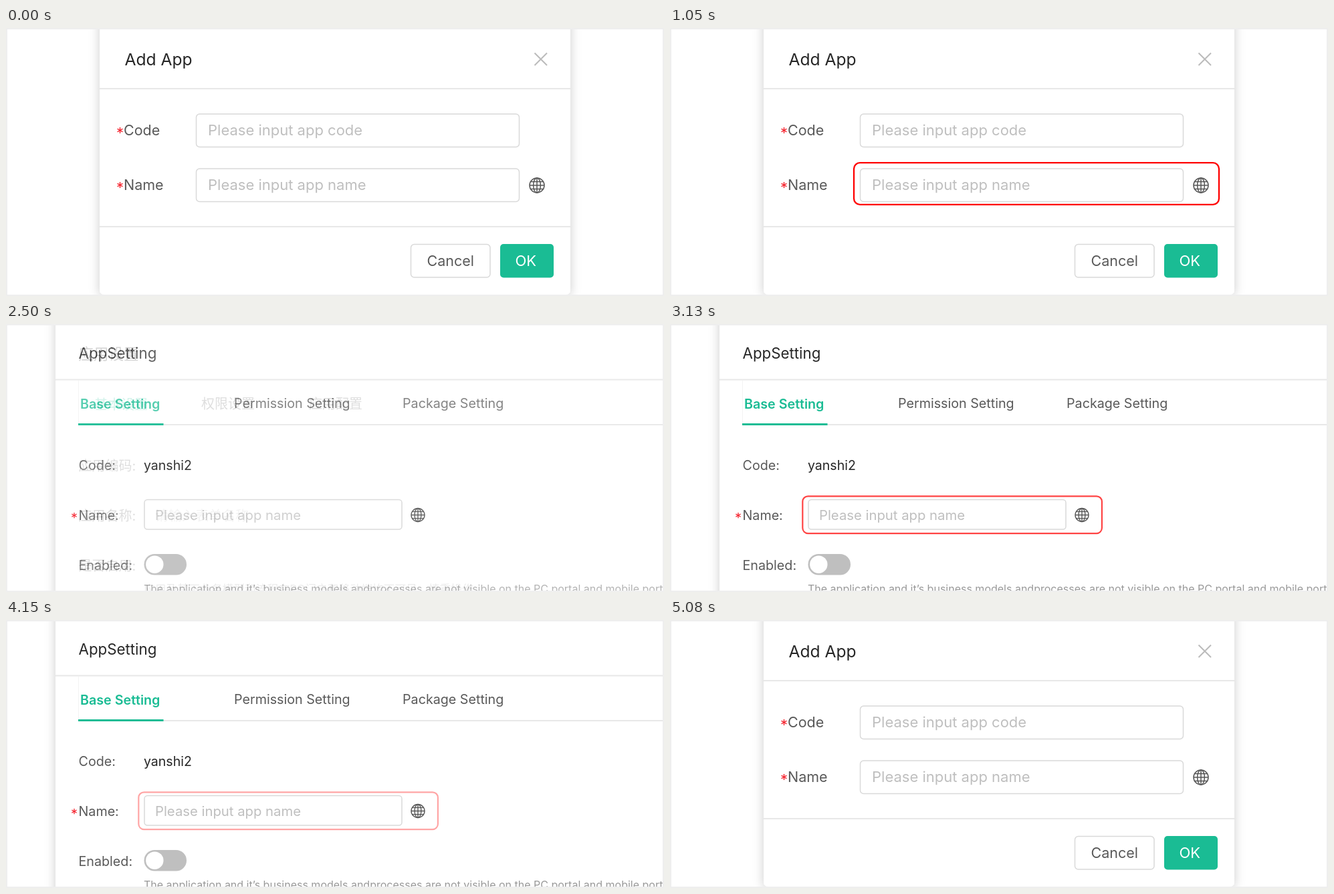
Write an HTML page that moves like this. It is 984 by 402 pixels and loops after 5140 ms.

```html
<!DOCTYPE html>
<html lang="en">
<head>
<meta charset="utf-8">
<title>Add App and AppSetting</title>
<style>
html, body { margin: 0; width: 100%; height: 100%; overflow: hidden; background: #fff; }
svg { position: absolute; left: 0; top: 0; width: 984px; height: 402px; }
text { font-family: Inter, "Noto Sans CJK SC", "Noto Sans CJK", sans-serif; white-space: pre; }
</style>
</head>
<body>
<svg id="stage" viewBox="0 0 984 402" xmlns="http://www.w3.org/2000/svg"></svg>
<script>
const LOOP = 5140;
const INK = '#262626', GREY = '#595959', PALE = '#bfbfbf', LINE = '#e8e8e8', GREEN = '#1abc94', RED = '#f5222d';

const text = (x, y, size, fill, str, extra = '') =>
  `<text x="${x}" y="${y}" font-size="${size}" fill="${fill}" ${extra}>${str}</text>`;
const box = (x, y, w, h, r, fill, stroke = 'none', sw = 1.5, extra = '') =>
  `<rect x="${x}" y="${y}" width="${w}" height="${h}" rx="${r}" fill="${fill}" stroke="${stroke}" stroke-width="${sw}" ${extra}/>`;
const path = (d, stroke, sw) => `<path d="${d}" fill="none" stroke="${stroke}" stroke-width="${sw}"/>`;
const star = (x, y, size) => text(x, y, size, RED, '*');

const globe = (x, y, r) => `<g transform="translate(${x} ${y}) scale(${r / 11})" fill="none" stroke="#555" stroke-width="1.5">
  <circle r="11"/><ellipse rx="5.4" ry="11"/><path d="M0-11V11M-11 0H11M-9.3-5.6H9.3M-9.3 5.6H9.3"/></g>`;

const layer = (id, body) => `<g id="${id}">${box(0, 0, 984, 402, 0, '#fff')}
  <g clip-path="url(#inner)">${body}</g>${box(1, 1, 982, 400, 0, 'none', '#eee', 2)}</g>`;

function modal(id, t) {
  return layer(id, `
    ${box(140, -20, 704, 420, 7, '#fff', 'none', 0, 'filter="url(#shade)"')}
    ${path('M140 91H844M140 298H844', LINE, 2)}
    ${text(177.5, 56, t.titleSize, INK, t.title)}
    ${path('M790.5 37.5L809 56M809 37.5L790.5 56', '#bbb', 2)}
    ${star(165, 165, 22)}${text(176, 161 + t.drop, t.label, GREY, t.code)}
    ${star(165, 247, 22)}${text(176, 243 + t.drop, t.label, GREY, t.name)}
    ${box(284.5, 129, 483, 49.5, 5, '#fff', '#d9d9d9')}
    ${box(284.5, 211, 483, 49.5, 5, '#fff', '#d9d9d9')}
    ${text(302, 161 + t.drop, 22, PALE, t.codeHint)}
    ${text(302, 243 + t.drop, 22, PALE, t.nameHint)}
    ${globe(794, 236, 11)}
    ${box(t.cancelX, 324.5, t.cancelW, 49.5, 5, '#fff', '#d9d9d9')}
    ${text(t.cancelX + t.cancelW / 2, 357 + t.drop, t.label, GREY, t.cancel, 'text-anchor="middle"')}
    ${box(t.okX, 324, 819 - t.okX, 50.5, 5, GREEN)}
    ${text(t.okText, 357 + t.drop, 22, '#fff', t.ok, 'text-anchor="middle"')}
    ${box(275, 202.2, 546, 62.6, 9, 'none', '#f00', 2.3, 'class="markA"')}`);
}

function settings(id, t) {
  return layer(id, `
    ${box(74, -20, 960, 460, 0, '#fff', 'none', 0, 'filter="url(#shade)"')}
    ${path('M74 83.5H984M108 151H984', LINE, 2)}
    ${path('M108.5 84V150', '#f3f3f3', 1)}
    ${text(108.5, 52 + t.drop, t.titleSize, INK, t.title)}
    ${t.tabs.map(([x, str], i) => i
      ? text(x, 126 + t.drop, t.size, GREY, str)
      : text(x, 127 + t.drop, t.size, GREEN, str, `font-weight="${t.bold}"`)).join('')}
    ${box(108, 149, 127.5, 3, 0, GREEN)}
    ${text(108.5, 219 + t.drop, t.size, GREY, t.code)}
    ${text(206, 219, 19.5, INK, 'yanshi2')}
    ${star(97, 298, 20)}${text(108.5, 294 + t.drop, t.size, GREY, t.name)}
    ${box(207, 263.5, 385, 44.5, 4.5, '#fff', '#d9d9d9')}
    ${text(223, 294 + t.drop, t.hintSize, PALE, t.hint)}
    ${globe(616, 286.5, 10)}
    ${text(108.5, 369 + t.drop, t.size, GREY, t.enabled)}
    ${box(206.5, 345, 63.5, 31.5, 15.75, PALE)}
    <circle cx="222.3" cy="360.7" r="13.2" fill="#fff"/>
    ${text(206, 403 + t.drop, t.noteSize, '#999', t.note)}
    ${box(198.3, 258.3, 447.6, 55.8, 8, 'none', '#f00', 2.2, 'class="markB"')}`);
}

const stage = document.getElementById('stage');
stage.innerHTML = `<defs>
    <clipPath id="inner"><rect x="2" y="2" width="980" height="398.5"/></clipPath>
    <filter id="shade" filterUnits="userSpaceOnUse" x="0" y="-60" width="1100" height="540">
      <feDropShadow dx="0" dy="2" stdDeviation="8" flood-color="#000" flood-opacity=".2"/></filter>
  </defs>` +
  modal('modalZh', {
    drop: 1, label: 22, titleSize: 25, title: '新建应用', code: '应用编码', name: '应用名称',
    codeHint: '请输入应用编码，例：bpmH3_01', nameHint: '请输入应用名称',
    cancel: '取消', cancelX: 618, cancelW: 93, ok: '确定', okX: 724, okText: 772
  }) +
  modal('modalEn', {
    drop: 0, label: 21.5, titleSize: 24.6, title: 'Add App', code: 'Code', name: 'Name',
    codeHint: 'Please input app code', nameHint: 'Please input app name',
    cancel: 'Cancel', cancelX: 605.5, cancelW: 118.5, ok: 'OK', okX: 739, okText: 777.3
  }) +
  settings('setZh', {
    drop: 1, size: 20, bold: 500, titleSize: 22.5, title: '应用设置',
    tabs: [[132, '基本设置'], [292, '权限设置'], [453, '应用配置']],
    code: '应用编码:', name: '应用名称:', enabled: '是否启用:',
    hintSize: 20, hint: '请输入表单名称', noteSize: 16.8,
    note: '应用及其下业务模型和流程在PC门户和移动端均不可见，慎重操作'
  }) +
  settings('setEn', {
    drop: 0, size: 19.7, bold: 600, titleSize: 22.3, title: 'AppSetting',
    tabs: [[111, 'Base Setting'], [341, 'Permission Setting'], [593, 'Package Setting']],
    code: 'Code:', name: 'Name:', enabled: 'Enabled:',
    hintSize: 20.3, hint: 'Please input app name', noteSize: 16,
    note: 'The application and it’s business models andprocesses are not visible on the PC portal and mobile portal'
  });

// Opacity over time: [ms, value], linear between points.
const modalFade = [[0, 1], [1720, 1], [2020, 0], [4480, 0], [4480, 1], [LOOP, 1]];
const setFade = [[0, 0], [2170, 0], [2620, 1], [4480, 1], [4690, .54], [5020, 0], [LOOP, 0]];
const tracks = {
  '#modalZh': modalFade,
  '#modalEn': modalFade,
  '#setZh': setFade,
  '#setEn': setFade,
  '.markA': [[0, 0], [350, 1], [700, 0], [1050, 1], [2200, 1], [2200, 0], [LOOP, 0]],
  '.markB': [[0, 0], [2870, 0], [3225, 1], [3575, 0], [3925, 1], [4275, 0], [LOOP, 0]]
};

for (const [sel, steps] of Object.entries(tracks)) {
  const frames = steps.map(([ms, opacity]) => ({ offset: ms / LOOP, opacity }));
  for (const el of stage.querySelectorAll(sel)) {
    el.animate(frames, { duration: LOOP, iterations: Infinity }).startTime = 0;
  }
}
</script>
</body>
</html>
```
